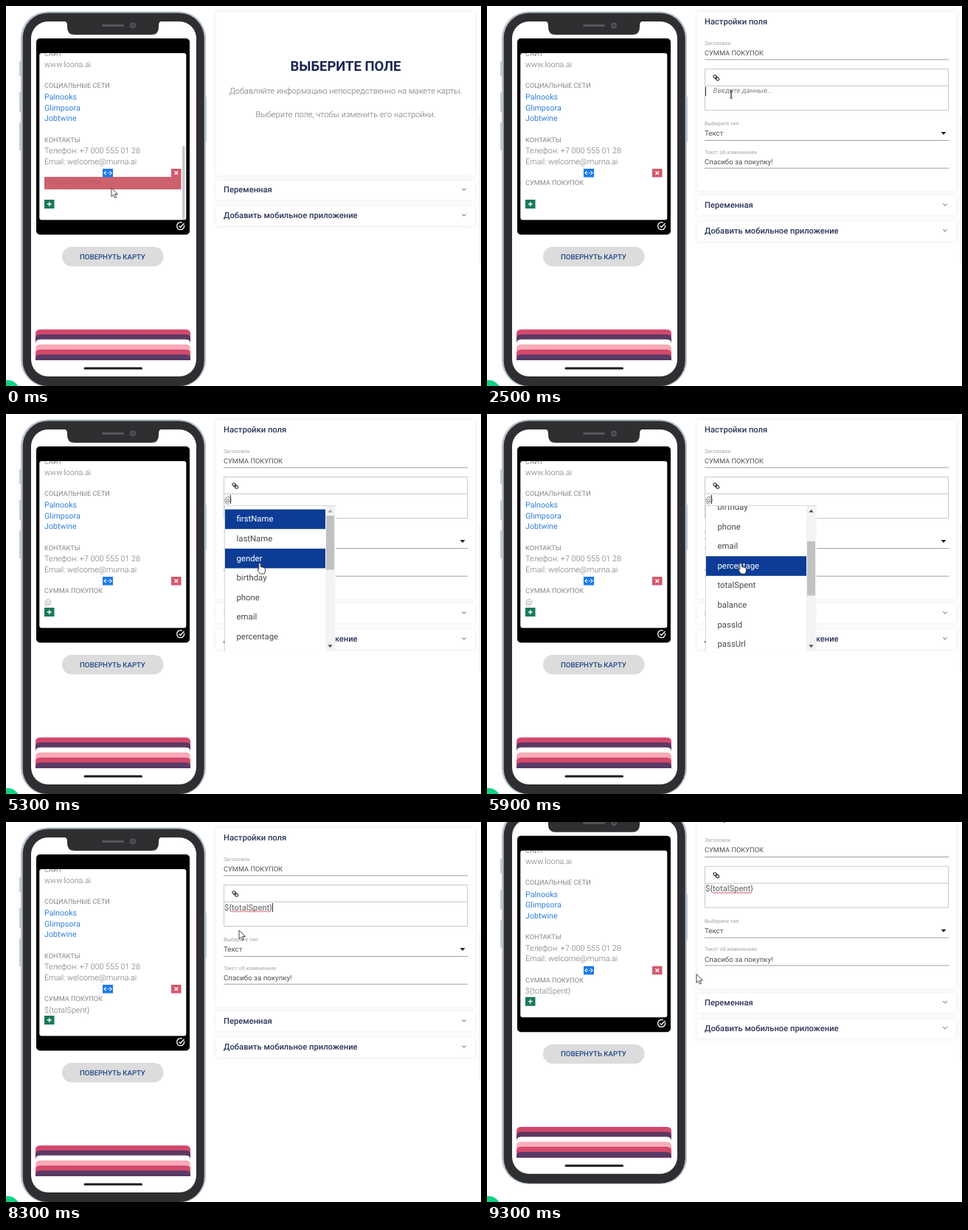
These frames come from a looping animation (644 by 516 pixels, 9.4 s). An HTML page:

```html
<!DOCTYPE html>
<html lang="ru">
<head>
<meta charset="utf-8">
<style>
  html, body { margin: 0; width: 100%; height: 100%; overflow: hidden; background: #fff; }
  svg { display: block; font-family: Roboto, "Noto Sans", sans-serif; text-rendering: geometricPrecision; }
  .light { font-size: 10.75px; font-weight: 300; fill: #747474; }
  .social { font-size: 10.7px; fill: #2f80dc; }
  .caps { font-size: 9.15px; fill: #858585; }
  .button { font-size: 9.6px; font-weight: 500; fill: #1f4788; }
  .title { font-size: 18.5px; font-weight: 700; fill: #1b2553; text-anchor: middle; }
  .hint { font-size: 11.1px; font-weight: 300; fill: #6c6f78; text-anchor: middle; }
  .head { font-size: 11.2px; font-weight: 500; fill: #2c3559; }
  .label { font-size: 7.2px; fill: #a2a2a2; }
  .value { font-size: 9.7px; fill: #505050; }
  .caps-value { font-size: 9.25px; fill: #505050; }
  .empty { font-size: 9.8px; font-style: italic; fill: #858585; }
  .editor { font-size: 11.2px; fill: #606060; }
  .item { font-size: 11.35px; fill: #4a4a4a; }
  .active { fill: #fff; }
  .box { fill: #fff; filter: drop-shadow(0 0 3px #3c50961f); }
  .line { fill: none; stroke: #a0a0a0; }
</style>
</head>
<body>
<svg id="stage" width="644" height="516" viewBox="0 0 644 516"></svg>
<script>
const LOOP = 9400, ITEM_TOP = 129.5, ITEM_HEIGHT = 26.65, LIST_SCROLL = 166.5;
const OPEN = 3900, PICK = 7100;
const fields = ["firstName", "lastName", "gender", "birthday", "phone", "email", "percentage",
  "totalSpent", "balance", "passId", "passUrl", "templateUrl", "scannerUrl", "registrationUrl"];

const text = (x, y, kind, content) => `<text x="${x}" y="${y}" class="${kind}">${content}</text>`;
const rect = (x, y, w, h, fill, r = 0) =>
  `<rect x="${x}" y="${y}" width="${w}" height="${h}" rx="${r}" fill="${fill}"/>`;
const box = (y, h) => `<rect class="box" x="285" y="${y}" width="351" height="${h}" rx="2"/>`;
const stroke = (d, color, width = 1) =>
  `<path d="${d}" fill="none" stroke="${color}" stroke-width="${width}"/>`;
const group = (id, content, extra = "") => `<g id="${id}" ${extra}>${content}</g>`;

function accordion(y, title) {
  return box(y, 26) + text(295, y + 16, "head", title) +
    stroke(`M618.3 ${y + 10.5}l2.7 2.7 2.7-2.7`, "#555");
}

function phone() {
  const buttons = [[18, 75, 20], [18, 117, 27], [18, 158, 38], [269, 123, 62]]
    .map(([x, y, h]) => rect(x, y, 3, h, "#c3cbd0", 1)).join("");
  const stack = ["#d2486b", "#5b3862", "#fff", "#f9abb9", "#d34a6b", "#5a3a66"]
    .map((color, i) => {
      const y = 439.2 + i * 6.8;
      return `<path d="M40 481V${y + 6}q0-6 6-6h198q6 0 6 6V481z" fill="${color}"/>`;
    }).join("");
  return buttons +
    rect(20, 7.5, 251, 509.5, "#b3c1ca", 36) + rect(22.7, 9.5, 246, 506.5, "#2f2f31", 34) +
    rect(34, 21, 224, 482, "#fff", 23) +
    `<path d="M78 20q5 1 5 6v3q0 10 10 10h104q10 0 10-10v-3q0-5 5-6z" fill="#2f2f31"/>` +
    rect(130, 25, 30, 3, "#54575a", 1.5) +
    `<circle cx="172" cy="26.5" r="4" fill="#505259"/><circle cx="172" cy="26.5" r="2" fill="#3c4150"/>` +
    rect(41, 44, 208, 266.5, "#000", 5) + rect(45.3, 64, 199, 226.5, "#fff", 3) +
    `<clipPath id="card"><path d="M45 64h200v226H45z"/></clipPath>
     <g clip-path="url(#card)">${text(52, 67.5, "caps", "САЙТ")}</g>` +
    text(52, 82.5, "light", "www.loona.ai") +
    text(52, 110.5, "caps", "СОЦИАЛЬНЫЕ СЕТИ") +
    ["Palnooks", "Glimpsora", "Jobtwine"].map((s, i) => text(52, 127 + i * 14.6, "social", s)).join("") +
    text(52, 184.5, "caps", "КОНТАКТЫ") +
    text(52, 200, "light", "Телефон: +7 000 555 01 28") +
    text(52, 214.7, "light", "Email: welcome@murna.ai") +
    text(52, 243, "caps", "СУММА ПОКУПОК") +
    `<text id="cardValue" x="52" y="258.5" class="light"></text>` +
    group("hovered", rect(52, 232, 185.5, 17, "#c9505fe6") + rect(239, 190, 3.5, 100, "#c9c9c9", 1.5)) +
    rect(131, 221, 14, 11.5, "#1b7ae8") +
    stroke("M135.5 224.5l-2.5 2.3 2.5 2.3M140.5 224.5l2.5 2.3-2.5 2.3M136 226.8h1.3m1.5 0h1.3", "#fff", 1.1) +
    rect(224, 221, 13.5, 11.5, "#d4596c") + stroke("M228.5 224.5l4.5 4.5m0-4.5l-4.5 4.5", "#fff", 1.3) +
    rect(52, 263, 13.5, 12, "#17785c") + stroke("M55.8 269h6m-3-3v6", "#fff", 1.3) +
    stroke("M241.5 297.5a5 5 0 1 1-2.5-3.2M234.5 298.5l2 2 5-5.5", "#fff", 1.3) +
    rect(76, 327, 137.5, 26.5, "#dcdcdc", 13.2) + text(100, 343.5, "button", "ПОВЕРНУТЬ КАРТУ") +
    stack + rect(105.5, 490.5, 79.5, 3, "#1c1c1e", 1.5);
}

function emptyPanel() {
  return box(8, 222) + text(460.5, 87.5, "title", "ВЫБЕРИТЕ ПОЛЕ") +
    text(460.5, 119, "hint", "Добавляйте информацию непосредственно на макете карты.") +
    text(460.5, 151, "hint", "Выберите поле, чтобы изменить его настройки.");
}

function settingsPanel() {
  return box(8, 243) + text(295, 24.7, "head", "Настройки поля") +
    text(295, 52.5, "label", "Заголовок") + text(295, 66.7, "caps-value", "СУММА ПОКУПОК") +
    `<path class="line" d="M295 72.8h331M295 182.5h331M295 220.2h331"/>` +
    stroke("M295.5 85.5h330v56h-330zM295.5 108.5h330", "#c8c8c8") +
    `<g transform="translate(310.8 97.5) rotate(42)" fill="none" stroke="#444" stroke-width="1.3">
       <rect x="-4.6" y="-1.8" width="5.3" height="3.6" rx="1.8"/><rect x="-.7" y="-1.8" width="5.3" height="3.6" rx="1.8"/></g>` +
    group("placeholder", text(306.5, 118, "empty", "Введите данные...")) +
    `<text id="editorValue" x="296" y="119.5" class="editor"></text>` +
    group("squiggle", stroke("M306 121.5q1-1.5 2 0" + "t2 0".repeat(25), "#e0415a", .9)) +
    group("caret", rect(0, 110, 1, 12, "#333")) +
    text(295, 162, "label", "Выберите тип") + text(295, 176.3, "value", "Текст") +
    `<path d="M615.5 171h7l-3.5 4z" fill="#222"/>` +
    text(295, 200.8, "label", "Текст об изменениях") + text(295, 215, "value", "Спасибо за покупку!");
}

function popup() {
  const rows = fields.map((name, i) => {
    const y = ITEM_TOP + i * ITEM_HEIGHT;
    return `<g class="mark">${rect(297, y, 136, ITEM_HEIGHT, "#0c3c95")}</g>` +
      text(312.5, y + 16.7, "item", name);
  }).join("");
  return rect(297, 124, 150, 198, "#fff") +
    `<clipPath id="list"><path d="M297 125h136v197H297z"/></clipPath>
    <g clip-path="url(#list)">${group("rows", rows)}</g>` +
    rect(433, 124, 13.5, 198, "#f3f3f3") +
    `<rect id="thumb" x="434" y="138" width="11" height="73.5" fill="#c1c1c1"/>
     <path id="up" d="M436.3 133.5h6.4l-3.2-3.8z"/>
     <path d="M436.3 313.5h6.4l-3.2 3.8z" fill="#505050"/>` +
    stroke("M296.5 322V124.5H447", "#d8d8d8");
}

const shapes = {
  arrow: `<path d="M0 0v11.8l2.7-2.5 1.9 4.2 1.9-.9-1.9-4.1h3.8z"/>`,
  hand: `<path d="M-1.2 1q1.2-2 2.4 0v4.5l4.8 1.2q1.5.4 1.5 2.2v2.1l-1.3 4H.5l-3.7-5.2q-.4-1.9 2-.5z"/>`,
  beam: `<path d="M-2-5.5q2 0 2 1.5v8q0 1.5-2 1.5M2-5.5q-2 0-2 1.5v8q0 1.5 2 1.5" fill="none"/>`
};

document.getElementById("stage").innerHTML =
  group("page", phone() + rect(641, 150, 3, 200, "#f5f6fa") + group("none", emptyPanel()) +
    group("settings", settingsPanel()) +
    group("accordions", accordion(258, "Переменная") + accordion(293, "Добавить мобильное приложение")) +
    group("popup", popup())) +
  `<circle cx="2.5" cy="524" r="16" fill="#0fd383"/>` +
  group("cursor", Object.entries(shapes).map(([id, d]) => group(id, d)).join(""),
    'fill="#fff" stroke="#333" stroke-width=".9" stroke-linejoin="round"');

const el = Object.fromEntries([...document.querySelectorAll("[id]")].map(e => [e.id, e]));
const marks = [...document.querySelectorAll(".mark")];
const labels = [...document.querySelectorAll(".item")];

const show = (id, on) => { el[id].style.display = on ? "" : "none"; };
const move = (id, x, y) => el[id].setAttribute("transform", `translate(${x} ${y})`);
const ease = (t, from, to) => {
  const p = Math.min(1, Math.max(0, (t - from) / (to - from)));
  return p * p * (3 - 2 * p);
};

// Each stop: start time, arrival time, x, y.
const route = [
  [0, 1, 143, 247], [1000, 1900, 331, 120], [2500, 2800, 333, 130], [3200, 3400, 336, 132],
  [3800, 3900, 335, 127], [4300, 5200, 344, 202], [6200, 6600, 356, 165],
  [7700, 8200, 316, 147], [8300, 8700, 298, 185], [8700, 9200, 284, 206.5]
];
function cursorAt(t) {
  let [, , x, y] = route[0];
  for (const [from, to, nextX, nextY] of route) {
    const p = ease(t, from, to);
    x += (nextX - x) * p;
    y += (nextY - y) * p;
  }
  return [x, y];
}

function draw(t) {
  const [x, y] = cursorAt(t);
  const editing = t >= 1000, open = t >= OPEN && t < PICK;
  const value = t < OPEN ? "" : t < PICK ? "@" : "${totalSpent}";

  show("none", !editing);
  show("settings", editing);
  move("accordions", 0, editing ? 0 : -21);
  show("hovered", t < 1200);
  move("page", 0, -25.3 * ease(t, 9000, 9300));

  el.cardValue.textContent = el.editorValue.textContent = value;
  show("placeholder", !value);
  show("squiggle", t >= PICK);
  const held = t >= 6600 && t < PICK;
  show("caret", t >= 2500 && !held && (t - 2500) % 1400 < 700);
  move("caret", t < OPEN ? 296 : t < PICK ? 304 : 361, 0);

  show("popup", open);
  const scrolled = (ease(t, 5300, 5700) + ease(t, 5800, 6200)) / 2;
  move("rows", 0, -LIST_SCROLL * scrolled);
  move("thumb", 0, 60.5 * scrolled);
  el.up.setAttribute("fill", scrolled ? "#505050" : "#a3a3a3");
  const hovered = Math.floor((y + 4 - ITEM_TOP + LIST_SCROLL * scrolled) / ITEM_HEIGHT);
  marks.forEach((mark, i) => {
    const on = i === 0 || i === hovered;
    mark.style.display = on ? "" : "none";
    labels[i].classList.toggle("active", on);
  });

  const shape = open && t >= 4300 ? "hand" : t >= 1800 && t < OPEN ? "beam" : "arrow";
  for (const id in shapes) show(id, id === shape);
  move("cursor", x, y);
}

const start = performance.now();
function frame() {
  const t = (performance.now() - start) % LOOP;
  draw(Math.floor(t / 100) * 100);
  requestAnimationFrame(frame);
}
frame();
</script>
</body>
</html>
```
